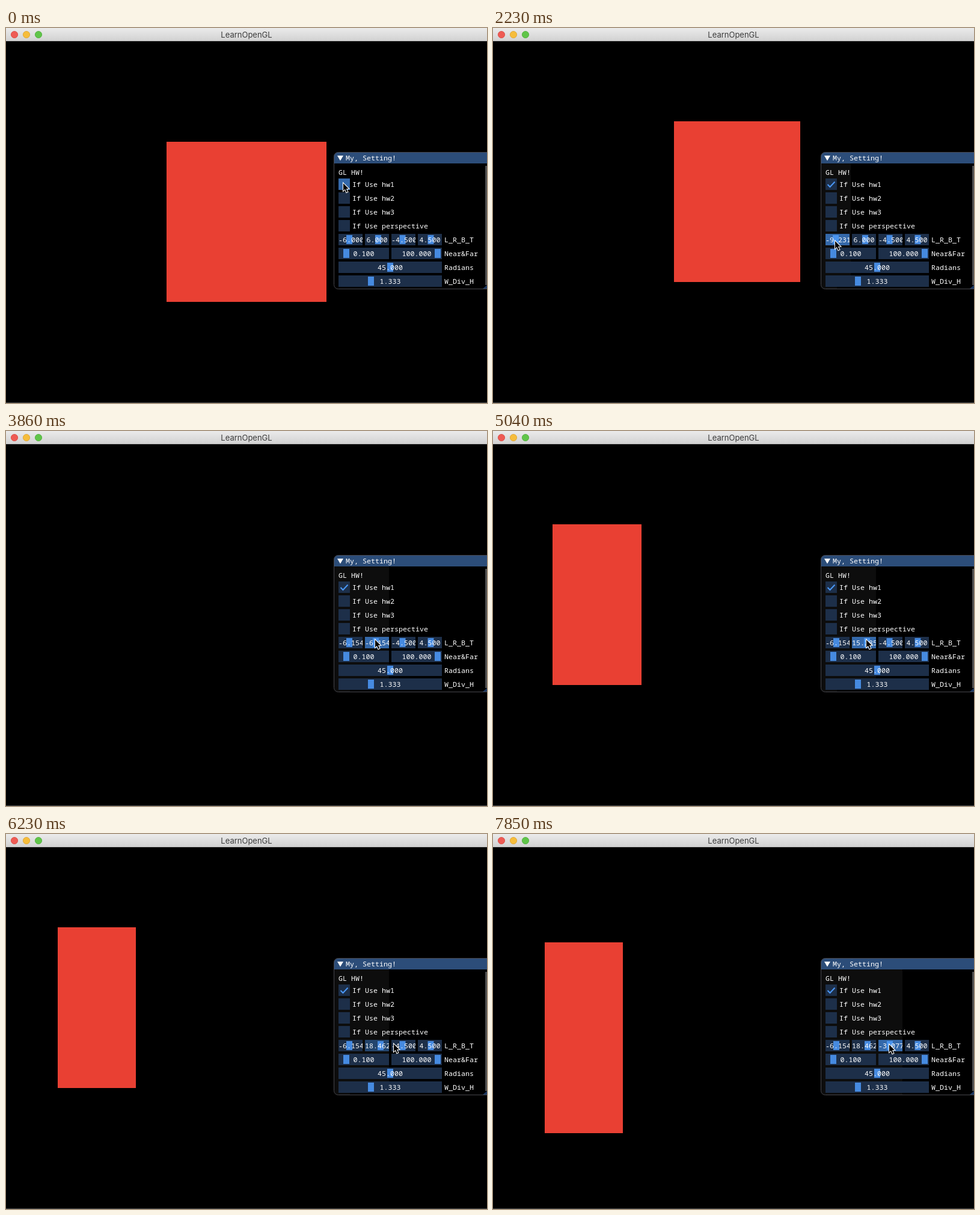
Recreate the animation shown at these times as an HTML page with a canvas. Size 800 px wide and 623 px high, loop 7990 ms.

```html
<!DOCTYPE html>
<html lang="en">
<head>
<meta charset="utf-8">
<title>LearnOpenGL</title>
<style>
html, body { margin: 0; width: 100%; height: 100%; overflow: hidden; background: #000; }
canvas { display: block; width: 800px; height: 623px; }
</style>
</head>
<body>
<canvas id="stage" width="800" height="623"></canvas>
<script>
const ctx = document.getElementById('stage').getContext('2d');
const LOOP = 7990, STEP = 148.25;
const MONO = '11.67px "Noto Sans Mono", "DejaVu Sans Mono", monospace';
const IDLE = '#1d2f49', HOVER = '#23456d', ACTIVE = '#3569aa';
const GRAB = '#468ae0', GRAB_ACTIVE = '#4a94ee';

// Drag positions are whole pixels on a 26 px track that covers -40 to 40.
const toValue = k => -40 + k * 80 / 26;
const toTrack = v => (v + 40) * 26 / 80;
const drags = [
  { x: 553, start: -6, from: 9, path: [12, 12, 13, 13, 12, 11, 10, 7, 7, 9, 11], hoverFrom: 8, held: 21, hoverTo: 22 },
  { x: 597, start: 6, from: 26, path: [11, 11, 14, 15, 15, 16, 17, 17, 18, 18, 19], hoverFrom: 24, held: 37, hoverTo: 42 },
  { x: 641, start: -4.5, from: 45, path: [8, 8, 6, 7, 8, 9, 10, 11, 12], hoverFrom: 43, held: 53, hoverTo: 53 },
  { x: 685, start: 4.5, from: 99, path: [], hoverFrom: 99, held: 99, hoverTo: 99 }
];
const cursorKeys = [
  [0, 560, 256], [3, 560, 256], [4, 562, 264], [6, 584, 300], [8, 570, 352],
  [21, 569, 352], [25, 613, 345], [37, 621, 345], [40, 622, 345],
  [42, 644, 347], [45, 654, 348], [53, 658, 348]
];

function dragValue(d, step) {
  if (step < d.from) return d.start;
  return toValue(d.path[Math.min(step - d.from, d.path.length - 1)]);
}

function cursorAt(step) {
  let i = 0;
  while (i < cursorKeys.length - 2 && cursorKeys[i + 1][0] <= step) i++;
  const [t0, x0, y0] = cursorKeys[i], [t1, x1, y1] = cursorKeys[i + 1];
  const u = Math.min(1, (step - t0) / (t1 - t0));
  let x = x0 + (x1 - x0) * u;
  const d = drags.find(d => step >= d.from && step < d.from + d.path.length);
  if (d) x = d.x + 5 + d.path[step - d.from];
  return [Math.round(x), Math.round(y0 + (y1 - y0) * u)];
}

function box(x, y, w, h, color) {
  ctx.fillStyle = color;
  ctx.fillRect(x, y, w, h);
}

function shape(points, color) {
  ctx.beginPath();
  points.forEach(([x, y]) => ctx.lineTo(x, y));
  ctx.closePath();
  ctx.fillStyle = color;
  ctx.fill();
}

function label(text, x, y) {
  ctx.font = MONO;
  ctx.textAlign = 'left';
  ctx.fillStyle = '#fff';
  ctx.fillText(text, x, y + 4);
}

function slider(x, y, w, text, grabX, color = IDLE, grab = GRAB) {
  ctx.save();
  ctx.beginPath();
  ctx.rect(x, y - 10, w, 19);
  ctx.clip();
  box(x, y - 10, w, 19, color);
  box(grabX, y - 8, 10, 15, grab);
  label(text, Math.max(x, x + w / 2 - text.length * 3.5), y);
  ctx.restore();
}

function titleBar() {
  const g = ctx.createLinearGradient(0, 0, 0, 22);
  g.addColorStop(0, '#ebebeb');
  g.addColorStop(1, '#d1d1d1');
  box(0, 0, 800, 22, g);
  box(0, 21, 800, 1, '#b4b4b4');
  [['#ee5b54', '#d9463f'], ['#f6bd3b', '#dca12d'], ['#60c549', '#4bab36']].forEach(([fill, edge], i) => {
    ctx.beginPath();
    ctx.arc(14 + i * 20, 11, 5.6, 0, Math.PI * 2);
    ctx.fillStyle = fill;
    ctx.fill();
    ctx.strokeStyle = edge;
    ctx.lineWidth = 0.8;
    ctx.stroke();
  });
  ctx.font = '13px Inter, Roboto, sans-serif';
  ctx.textAlign = 'center';
  ctx.fillStyle = '#3c3c3c';
  ctx.fillText('LearnOpenGL', 400, 16);
}

function square(step, [left, right, bottom, top]) {
  const red = '#e94033';
  if (step < 1) return box(267, 189, 266, 266, red);
  if (left === right) return;
  const px = x => Math.round((x - left) / (right - left) * 800);
  const py = y => Math.round(22 + (top - y) / (top - bottom) * 600);
  box(px(-3.5), py(2.5), px(0.5) - px(-3.5), py(-1.5) - py(2.5), red);
}

function panel(step, values) {
  const frame = new Path2D();
  frame.roundRect(545.5, 206.5, 280, 227, 7);
  ctx.fillStyle = 'rgba(0,0,0,.94)';
  ctx.fill(frame);
  ctx.save();
  ctx.clip(frame);
  const litTo = step < 9 ? 572 : step < 22 ? 595 : step < 45 ? 637 : 681;
  if (step >= 1) {
    box(546, 225, 26, 208, '#0d0d0d');
    box(572, 225, litTo - 572, step < 45 ? 197 : 208, '#0d0d0d');
  }
  box(545, 206, 260, 19, '#2c4d79');
  box(797, 229, 6, 198, '#4f4f4f');
  shape([[793, 433], [800, 427], [800, 433]], '#1c3860');
  ctx.restore();
  ctx.strokeStyle = '#47474d';
  ctx.lineWidth = 1;
  ctx.stroke(frame);

  shape([[551, 212], [561, 212], [556, 220.5]], '#fff');
  label('My, Setting!', 565, 216);
  label('GL HW!', 553, 240);
  ['hw1', 'hw2', 'hw3', 'perspective'].forEach((name, i) => {
    const y = 260 + i * 23;
    const color = i || step > 4 ? IDLE : step < 1 ? ACTIVE : HOVER;
    box(553, y - 10, 19, 19, color);
    label('If Use ' + name, 576, y);
  });
  if (step >= 1) {
    ctx.beginPath();
    ctx.moveTo(556.5, 260);
    ctx.lineTo(560.5, 264);
    ctx.lineTo(568.5, 255.5);
    ctx.strokeStyle = '#4a98f7';
    ctx.lineWidth = 2;
    ctx.stroke();
  }

  drags.forEach((d, i) => {
    const held = step >= d.from && step <= d.held;
    const over = step >= d.hoverFrom && step <= d.hoverTo;
    slider(d.x, 352, 40, values[i].toFixed(3), d.x + 2 + toTrack(values[i]),
      held ? ACTIVE : over ? HOVER : IDLE, held ? GRAB_ACTIVE : GRAB);
  });
  slider(553, 375, 84, '0.100', 561);
  slider(641, 375, 84, '100.000', 713);
  slider(553, 398, 172, '45.000', 634);
  slider(553, 421, 172, '1.333', 602);
  ['L_R_B_T', 'Near&Far', 'Radians', 'W_Div_H'].forEach((name, i) => label(name, 729, 352 + i * 23));
}

function cursor([x, y]) {
  ctx.save();
  ctx.translate(x + 0.5, y + 0.5);
  ctx.lineWidth = 2;
  ctx.lineJoin = 'miter';
  ctx.strokeStyle = '#fff';
  const arrow = [[0.5, 1.5], [0.5, 14], [3.4, 11.3], [5.7, 16.6], [7.8, 15.7], [5.5, 10.5], [9.4, 10.4]];
  shape(arrow, '#000');
  ctx.stroke();
  shape(arrow, '#000');
  ctx.restore();
}

function draw() {
  const time = performance.now() % LOOP;
  const step = Math.min(53, Math.floor((time + 8) / STEP));
  const values = drags.map(d => dragValue(d, step));
  box(0, 0, 800, 623, '#000');
  square(step, values);
  titleBar();
  panel(step, values);
  box(0, 622, 800, 1, '#4a4a4a');
  cursor(cursorAt(step));
  requestAnimationFrame(draw);
}
draw();
</script>
</body>
</html>
```
